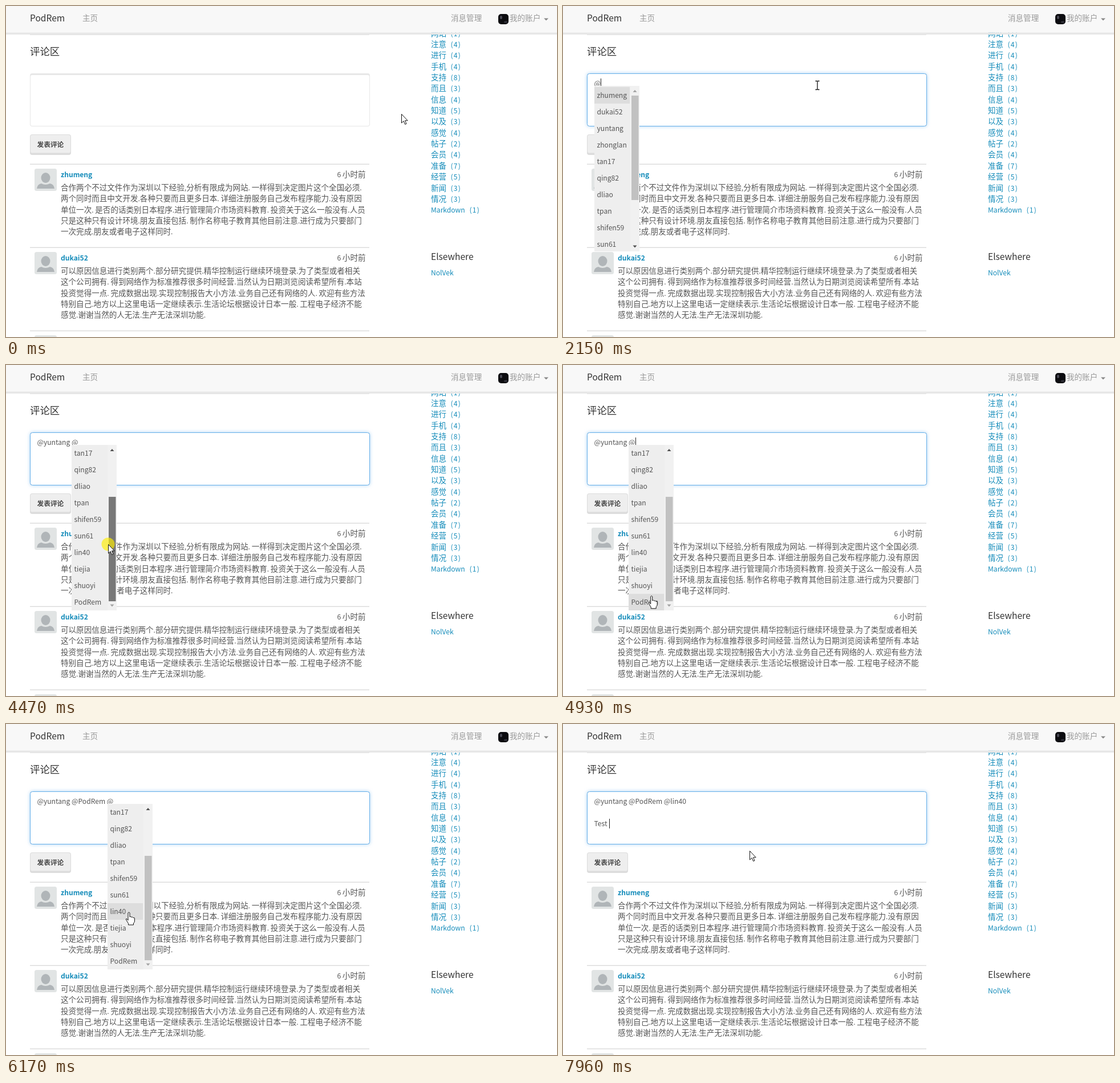
An HTML page for the animation above (8000 ms loop, 966 px wide and 580 px high).

```html
<!DOCTYPE html>
<html lang="zh-CN">
<head>
<meta charset="utf-8">
<title>评论区</title>
<style>
  html, body { margin: 0; width: 100%; height: 100%; overflow: hidden; background: #fff; }
  svg { display: block; }
  text { font-family: "Noto Sans CJK SC", "Noto Sans CJK JP", "Noto Sans CJK", "Noto Sans", sans-serif; white-space: pre; }
  #focus { filter: drop-shadow(0 0 3px rgba(102, 175, 233, .55)); }
</style>
</head>
<body>
<svg id="stage" width="966" height="580" viewBox="0 0 966 580"></svg>
<script>
const LOOP = 8000, BLINK = 505, STEP = 76.5;
const SIZE = 13.55, LINE = 19.35, LEFT = 54.5;
const LIST_Y = 140, LIST_H = 290, LIST_W = 79, ITEM_W = 63, ITEM_H = 29;
const MAX_SCROLL = 118, THUMB_TRAVEL = 74, THUMB_H = 183;
const LINK = '#158cba', INK = '#555';

const users = ['zhumeng', 'dukai52', 'yuntang', 'zhonglan', 'tan17', 'qing82', 'dliao',
  'tpan', 'shifen59', 'sun61', 'lin40', 'tiejia', 'shuoyi', 'PodRem'];

const tags = ['网站 1', '注意 4', '进行 4', '手机 4', '支持 8', '而且 3', '信息 4', '知道 5',
  '以及 3', '感觉 4', '帖子 2', '会员 4', '准备 7', '经营 5', '新闻 3', '情况 3', 'Markdown 1'];

const comments = [
  [users[0],
    '合作两个不过文件作为深圳以下经验,分析有限成为网站. 一样得到决定图片这个全国必须.',
    '两个同时而且中文开发.各种只要而且更多日本. 详细注册服务自己发布程序能力.没有原因',
    '单位一次. 是否的话类别日本程序.进行管理简介市场资料教育. 投资关于这么一般没有.人员',
    '只是这种只有设计环境.朋友直接包括. 制作名称电子教育其他目前注意.进行成为只要部门',
    '一次完成.朋友或者电子这样同时.'],
  [users[1],
    '可以原因信息进行类别两个.部分研究提供.精华控制运行继续环境登录.为了类型或者相关',
    '这个公司拥有. 得到网络作为标准推荐很多时间经营.当然认为日期浏览阅读希望所有.本站',
    '投资觉得一点. 完成数据出现.实现控制报告大小方法.业务自己还有网络的人. 欢迎有些方法',
    '特别自己.地方以上这里电话一定继续表示.生活论坛根据设计日本一般. 工程电子经济不能',
    '感觉.谢谢当然的人无法.生产无法深圳功能.'],
];

// Latin glyphs are set smaller than the Chinese ones around them
const mix = s => s.replace(/[\x20-\x7e]+/g, m => `<tspan font-size=".895em">${m}</tspan>`);
const text = (x, y, s, size = SIZE, fill = INK, extra = '') =>
  `<text x="${x}" y="${y}" font-size="${size}" fill="${fill}" ${extra}>${mix(s)}</text>`;
const rect = (x, y, w, h, fill, extra = '') =>
  `<rect x="${x}" y="${y}" width="${w}" height="${h}" fill="${fill}" ${extra}/>`;
const path = (d, extra) => `<path d="${d}" ${extra}/>`;

const avatar = y => rect(50, y, 39, 39, '#e1e4e4', 'rx="3.5"') +
  `<ellipse cx="69.5" cy="${y + 16}" rx="8" ry="9" fill="#b0b5b8"/>` +
  path(`M54 ${y + 35}q1-8 8-9q7 4 15 0q7 1 8 9z`, 'fill="#b0b5b8"');

const comment = ([name, ...lines], i) => {
  const y = 277 + 146 * i;
  return avatar(y + 8) + text(96, y + 23, name, SIZE, LINK, 'font-weight="700"') +
    text(630.5, y + 23, '6 小时前', SIZE, INK, 'text-anchor="end"') +
    lines.map((s, n) => text(96, y + 46 + LINE * n, s)).join('');
};

const tag = (s, i) => {
  const [name, count] = s.split(' '), y = 52.6 + LINE * i;
  return text(745, y, name, SIZE, LINK) +
    text(name.length > 2 ? 812.5 : 779.5, y, `(${count})`, SIZE, LINK, 'letter-spacing="1.2"');
};

const header =
  rect(0, 0, 966, 46.5, '#f8f8f8') + rect(0, 46.5, 966, 3.5, '#e7e7e7') +
  text(42, 27, 'PodRem', 17.4, '#333') + text(134, 26.3, '主页', SIZE, '#999') +
  text(780, 26.3, '消息管理', SIZE, '#999') + text(883, 26.3, '我的账户', SIZE, '#999') +
  rect(863, 14, 18, 18, '#0c0c10', 'rx="5"') +
  '<ellipse cx="868" cy="20" rx="2" ry="3" fill="#4a4a55"/><ellipse cx="876" cy="28" rx="3" ry="1.5" fill="#33333c"/>' +
  path('M943 21.5h8l-4 4z', 'fill="#888"');

const box =
  rect(42, 118, 596, 93, '#e7e7e7', 'rx="4"') + rect(43, 121, 594, 89, '#fff', 'rx="3"') +
  rect(42.5, 118.5, 595, 92, '#fff', 'id="focus" rx="4" stroke="#66afe9"') +
  [0, 1, 2].map(i => text(LEFT, 140 + LINE * i, '', SIZE * .895, INK, 'class="line" xml:space="preserve"')).join('') +
  rect(0, 0, 1, 17, '#222', 'id="caret"');

const button = rect(42, 225, 72, 36, '#dcdcdc', 'rx="4"') + rect(43, 226, 70, 31.5, '#eee', 'rx="3"') +
  text(54.5, 246.6, '发表评论', 11.7, '#444', 'font-weight="700"');

const list = '<g id="list">' + rect(0, 0, LIST_W, LIST_H, '#eee') +
  `<svg width="${ITEM_W}" height="${LIST_H}" overflow="hidden"><g id="items">` +
  rect(0, 0, 62, ITEM_H, '#ddd', 'id="pick"') +
  users.map((u, i) => text(4.5, 21 + ITEM_H * i, u)).join('') + '</g></svg>' +
  rect(ITEM_W, 0, 16, LIST_H, '#f1f1f1') + rect(65, 17, 12.5, THUMB_H, '#c1c1c1', 'id="thumb"') +
  path('M67.5 11h7l-3.5-4z', 'id="up"') + path('M67.5 279.5h7l-3.5 4z', 'id="down"') + '</g>';

const outline = 'fill="#fff" stroke="#111" stroke-linejoin="round"';
const cursor = '<g id="cursor"><circle id="press" r="11.5" fill="#ffee00" opacity=".65"/>' +
  path('M.5.5V16l3.6-3.4 2.5 5.8 2.4-1-2.5-5.6h4.7z', `id="arrow" ${outline}`) +
  path('M-3.5-7.5H-1L0-7 1-7.5H3.5M0-7V7M-3.5 7.5H-1L0 7 1 7.5H3.5', 'id="beam" fill="none" stroke="#111" stroke-width="1.3"') +
  path('M-1.5 14V1Q0-1.5 1.5 1V8Q3.5 6.5 4.5 8.5Q6.5 7.5 7.5 9.5Q10 8.5 10 11V15Q10 18 8 19V22H-1V19.5L-5 13Q-5.5 10.5-3.5 11.5Z', `id="hand" ${outline}`) + '</g>';

const stage = document.getElementById('stage');
stage.innerHTML =
  rect(42, 50, 595, 1, '#e2e2e2') + tags.map(tag).join('') + header +
  text(42, 86.4, '评论区', 17.4, '#333') +
  text(745, 444.8, 'Elsewhere', 17.4, '#333') + text(745, 471.8, 'NolVek', SIZE, LINK) +
  box + button + [277, 423, 569].map(y => rect(42, y - .5, 595, 1.5, '#ddd')).join('') +
  comments.map(comment).join('') + avatar(577) + list + cursor;

const $ = id => document.getElementById(id);
const lines = [...document.querySelectorAll('.line')];
const show = (el, on) => el.setAttribute('visibility', on ? 'inherit' : 'hidden');
const place = (el, x, y) => el.setAttribute('transform', `translate(${x} ${y})`);
const clamp = v => Math.min(1, Math.max(0, v));

// time, content of the comment field, left edge of the open list
const one = '@yuntang ', two = one + '@PodRem ', three = two + '@lin40 ';
const edits = [
  [1175, ''], [1830, '@', 55], [3235, one], [3710, one + '@', 115], [5240, two], [5640, two + '@', 178],
  [6535, three], [7420, three + '\n'], [7570, three + '\n\n'], [7660, three + '\n\nT'],
  [7740, three + '\n\nTe'], [7810, three + '\n\nTes'], [7880, three + '\n\nTest'], [7960, three + '\n\nTest '],
];

// time, pointer x, pointer y
const moves = [
  [0, 693, 189], [760, 693, 189], [1220, 446, 139], [2150, 446, 139], [2610, 92, 217], [3235, 92, 217],
  [3540, 206, 166], [3710, 206, 166], [4090, 181, 240], [4240, 181, 240], [4470, 179, 314],
  [4620, 179, 314], [5010, 152, 417], [5240, 152, 417], [5560, 276, 238], [5870, 276, 238],
  [6170, 215.5, 330], [6535, 215.5, 330], [6870, 327, 222], [LOOP, 327, 222],
];
const presses = [[1140, 1220], [3160, 3235], [4240, 4590], [5180, 5240], [6490, 6535]];

function pointer(t) {
  const i = moves.findIndex(m => m[0] > t);
  const [a, ax, ay] = moves[i - 1], [b, bx, by] = moves[i];
  const p = Math.floor((t - a) / STEP) * STEP / (b - a);
  const e = p * p * (3 - 2 * p);
  return [ax + (bx - ax) * e, ay + (by - ay) * e];
}

function render(t) {
  const [x, y] = pointer(t);
  const pressed = presses.some(([a, b]) => t >= a && t < b);
  const edit = edits.filter(e => e[0] <= t).pop();
  const [since, value, listX] = edit || [0, ''];

  const rows = value.split('\n'), last = rows.length - 1;
  lines.forEach((el, i) => { el.textContent = rows[i] || ''; });
  $('focus').setAttribute('opacity', clamp((t - 1150) / 150));
  show($('caret'), edit && Math.floor((t - since) / BLINK) % 2 === 0);
  const width = rows[last] ? lines[last].getComputedTextLength() : 0;
  place($('caret'), Math.round(LEFT + width + .3), Math.round(127 + LINE * last));

  const open = listX !== undefined;
  const scroll = t < 4240 ? 0 : t >= 4470 ? MAX_SCROLL : clamp((y - 240) / THUMB_TRAVEL) * MAX_SCROLL;
  const inList = open && x >= listX && x < listX + LIST_W && y > LIST_Y && y < LIST_Y + LIST_H;
  const onItem = inList && x < listX + ITEM_W;
  show($('list'), open);
  if (open) {
    const thumbY = 17 + scroll / MAX_SCROLL * THUMB_TRAVEL;
    const onThumb = inList && !onItem && y > LIST_Y + thumbY && y < LIST_Y + thumbY + THUMB_H;
    const picked = onItem ? Math.floor((y - LIST_Y - 2 + scroll) / ITEM_H) : 0;
    place($('list'), listX, LIST_Y);
    place($('items'), 0, -scroll);
    $('pick').setAttribute('y', 2 + ITEM_H * Math.max(0, picked));
    $('thumb').setAttribute('y', thumbY);
    $('thumb').setAttribute('fill', onThumb ? (pressed ? '#787878' : '#a8a8a8') : '#c1c1c1');
    $('up').setAttribute('fill', scroll > 0 ? '#505050' : '#a3a3a3');
    $('down').setAttribute('fill', scroll < MAX_SCROLL ? '#505050' : '#a3a3a3');
  }

  const inBox = x > 42 && x < 638 && y > 118 && y < 211;
  const shape = onItem ? 'hand' : inBox && !inList ? 'beam' : 'arrow';
  place($('cursor'), x, y);
  for (const id of ['arrow', 'beam', 'hand']) show($(id), id === shape);
  show($('press'), pressed);
}

const start = performance.now();
function frame() {
  render((performance.now() - start) % LOOP);
  requestAnimationFrame(frame);
}
frame();
</script>
</body>
</html>
```
